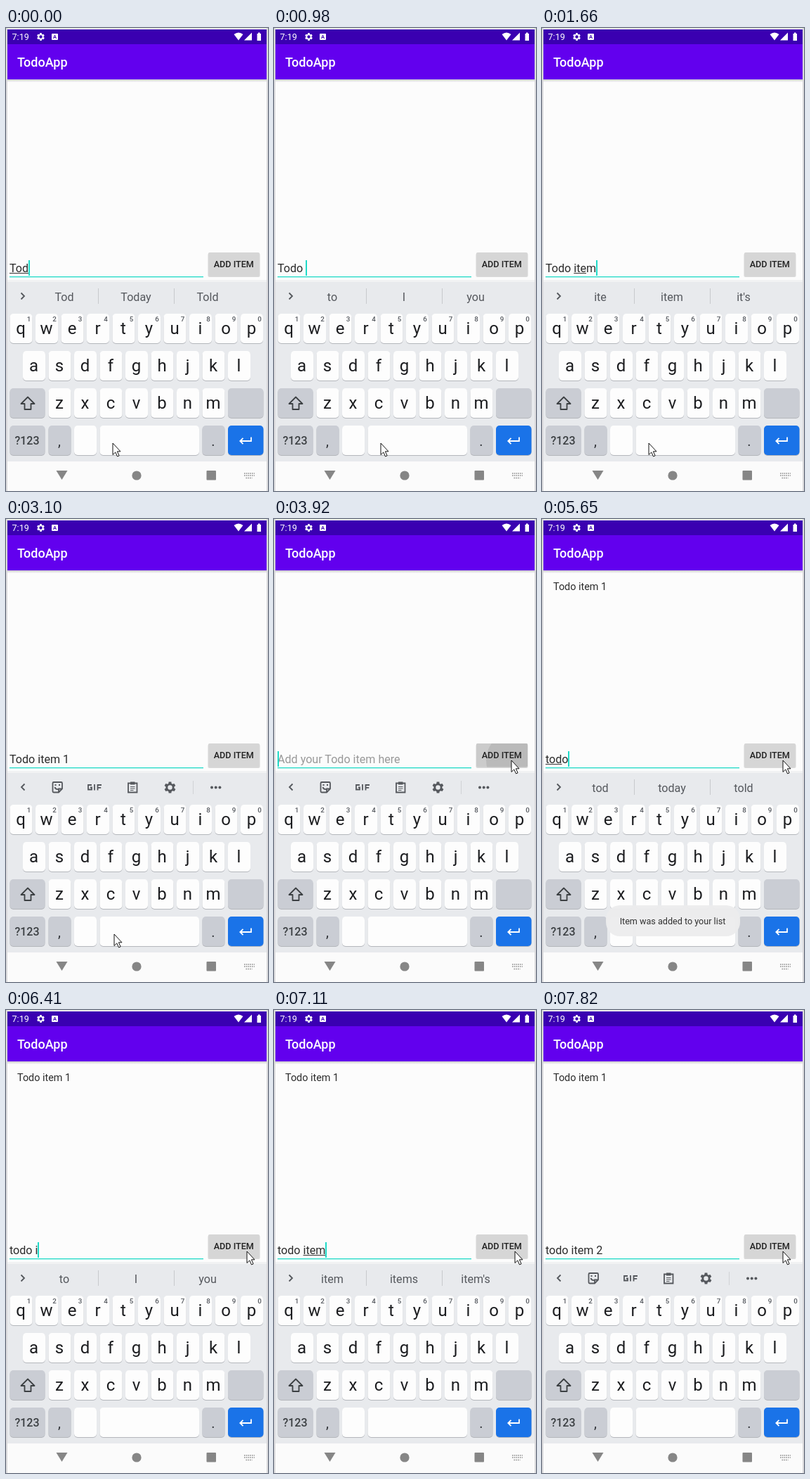
An HTML page that plays this animation: 373x658 px, repeating every 8 s.

```html
<!DOCTYPE html>
<html lang="en">
<head>
<meta charset="utf-8">
<title>Todo app</title>
<style>
html, body { margin: 0; width: 100%; height: 100%; overflow: hidden; background: #fff; }
svg { display: block; width: 373px; height: 658px; }
text { font-family: Roboto, Arial, sans-serif; white-space: pre; }
.medium { font-weight: 500; }
.mid { text-anchor: middle; }
.key { font-size: 24px; fill: #1c1d20; }
.mark { font-size: 20px; fill: #303338; }
.digit { font-size: 9.8px; fill: #54585e; }
.hintbar { font-size: 16.1px; fill: #55585d; }
.line { fill: none; stroke-width: 1.8; }
</style>
</head>
<body>
<svg viewBox="0 0 373 658">
  <defs>
    <linearGradient id="shade" x2="0" y2="1">
      <stop stop-color="#c9c9cb"/><stop offset="1" stop-color="#fcfcfc"/>
    </linearGradient>
    <clipPath id="buttonClip"><rect x="288" y="319" width="73" height="33.5" rx="2"/></clipPath>
    <path id="gear" fill-rule="evenodd" d="M19.4 13a7.500 7.500 0 0 0 0-2l2.100-1.600-2-3.500-2.500 1a7.300 7.300 0 0 0-1.700-1L15 3.200h-4l-.4 2.700a7.300 7.300 0 0 0-1.700 1l-2.500-1-2 3.500L6.500 11a7.500 7.500 0 0 0 0 2l-2.100 1.600 2 3.500 2.500-1a7.300 7.300 0 0 0 1.700 1l.4 2.700h4l.4-2.700a7.300 7.300 0 0 0 1.700-1l2.500 1 2-3.500zM13 15.500a3.500 3.500 0 1 1 0-7 3.500 3.500 0 0 1 0 7z" transform="translate(-13 -12)"/>
  </defs>

  <rect width="373" height="658" fill="#d9d9dc"/>
  <rect x="2" y="1" width="369" height="657" fill="#fcfcfc"/>
  <rect x="2" y="73" width="369" height="4" fill="url(#shade)"/>

  <!-- status and app bars -->
  <rect x="2" y="2" width="369" height="21" fill="#3a00b1"/>
  <rect x="2" y="23" width="369" height="50" fill="#6200ee"/>
  <g fill="#fff">
    <text x="8.500" y="17" font-size="12.6">7:19</text>
    <use href="#gear" transform="translate(49.500 12.500) scale(.62)"/>
    <rect x="65" y="8" width="9" height="9" rx="1"/>
    <path d="M67.500 15l2-5 2 5M68.200 13.500h2.600" fill="none" stroke="#3a00b1"/>
    <path d="M324.500 9Q331 4 337.500 9L331 17.500zM350 6.500v11h-11zM357.500 8h1.500V6.500h2.500V8H363v10h-5.500z"/>
    <text x="16" y="55" font-size="18" class="medium">TodoApp</text>
  </g>

  <text id="item" x="16" y="100.500" font-size="14.4" fill="#2b2b2b">Todo item 1</text>

  <!-- entry row -->
  <rect x="5" y="353" width="276" height="1.300" fill="#1fdac8"/>
  <text id="entry" x="5" y="347" font-size="16.1"/>
  <rect id="under" y="348" height="1" fill="#333"/>
  <rect id="caret" y="330" width="2" height="22" fill="#1fdac8"/>
  <rect x="287.500" y="320" width="74" height="34" rx="2" fill="#c4c4c4" opacity=".6"/>
  <rect x="288" y="319" width="73" height="33.500" rx="2" fill="#d6d6d6"/>
  <g id="ripple" clip-path="url(#buttonClip)">
    <rect x="288" y="319" width="73" height="34" fill="#cbcbcb"/>
    <circle cx="343" cy="343" r="41" fill="#bababa"/>
  </g>
  <text x="324.300" y="340" font-size="12.6" class="medium mid" fill="#222">ADD ITEM</text>

  <!-- keyboard -->
  <rect x="2" y="358" width="369" height="3" fill="#f1f2f3"/>
  <rect x="2" y="361" width="369" height="255" fill="#e8eaed"/>
  <g id="words">
    <path d="M21.500 376.500l4.500 4.500-4.500 4.500" class="line" stroke="#55585d"/>
    <path d="M131.500 370v22M239.500 370v22" stroke="#c8cacd"/>
    <text class="hintbar mid" x="83" y="387.500"/>
    <text class="hintbar mid" x="185" y="387.500"/>
    <text class="hintbar mid" x="287" y="387.500"/>
  </g>
  <g id="tools" fill="#55585d" stroke="#55585d">
    <path d="M26.500 376.500l-4.500 4.500 4.500 4.500" class="line"/>
    <path d="M68 374h10.500a1.500 1.500 0 0 1 1.500 1.500v8l-5 5h-7a1.500 1.500 0 0 1-1.500-1.500v-11.500a1.500 1.500 0 0 1 1.500-1.500zM75 388v-4.500h5M69.500 381q1 3.800 5 3" class="line" stroke-width="1.500"/>
    <path d="M69.500 378h2m3.500 0h2" stroke-width="1.800"/>
    <path d="M122 378h-5v6.500h5v-3h-2.200M126 377v8.500M130.500 385.500V378h5.500M130.500 381.800h4.700" class="line"/>
    <path d="M174 375.500h12.500v13H174z" class="line" stroke-width="1.500"/>
    <path d="M177 373.500h6.500v4H177z" stroke="none"/>
    <path d="M177 380.500h6.500M177 383h6.500M177 385.500h4.500" stroke-width="1.200"/>
    <use href="#gear" stroke="none" transform="translate(233.500 381.500) scale(.92)"/>
    <path d="M266.500 372v19" stroke="#d0d2d5"/>
    <g stroke="none"><circle cx="293" cy="381.500" r="2"/><circle cx="298.700" cy="381.500" r="2"/><circle cx="304.400" cy="381.500" r="2"/></g>
  </g>
  <g id="keys"></g>
  <path d="M31 524.500l-9.500 9.500h5v8h9v-8h5z" class="line" stroke="#3c4043" stroke-linejoin="round" stroke-width="1.700"/>
  <path d="M349 581.500v5.500h-15.500m4-4.200l-4.200 4.200 4.200 4.200" class="line" stroke="#fff"/>

  <!-- toast -->
  <g id="toast">
    <rect x="91" y="549" width="191" height="44" rx="20" fill="#ededee" opacity=".96"/>
    <text x="186" y="576" font-size="12.6" class="mid" fill="#303030">Item was added to your list</text>
  </g>

  <!-- navigation bar -->
  <rect x="2" y="616" width="369" height="42" fill="#fbfbfb"/>
  <g fill="#868686">
    <path d="M71.500 629h16l-8 13z"/>
    <circle cx="186" cy="636" r="6.600"/>
    <rect x="285.500" y="629" width="13.500" height="13.500" rx="1"/>
    <path d="M339 633h15M339 636h15M341.500 639.500h9" stroke="#8d8d8d" stroke-width="1.400" stroke-dasharray="1.600 1.200"/>
  </g>

  <path id="mouse" d="M0 0v16.500l3.800-3.600 2.700 6 2.600-1.100-2.700-6H11z" fill="#fff" stroke="#111" stroke-linejoin="round"/>
</svg>

<script>
const LOOP = 8000, FONT = '16.1px Roboto, Arial, sans-serif';
const $ = id => document.getElementById(id);
const pen = document.createElement('canvas').getContext('2d');
const width = s => { pen.font = FONT; return pen.measureText(s).width; };

// keyboard
let markup = '';
function key(x, y, w, label = '', fill = '#fdfdfd', cls = 'key') {
  const base = y + (cls === 'medium' ? 27 : 28.5);
  markup += `<rect x="${x}" y="${y + 1}" width="${w}" height="42" rx="5" fill="#b4b7bc"/>
    <rect x="${x}" y="${y}" width="${w}" height="42" rx="5" fill="${fill}"/>
    <text x="${x + w / 2 - 0.5}" y="${base}" class="${cls} mid">${label}</text>`;
}
const PITCH = 36.5, GREY = '#cacdd4';
[['qwertyuiop', 5.5, 406], ['asdfghjkl', 24, 459], ['zxcvbnm', 60.5, 512]].forEach(([row, x0, y]) =>
  [...row].forEach((c, i) => {
    const x = x0 + i * PITCH;
    key(x, y, 32, c);
    if (y === 406) markup += `<text x="${x + 27}" y="417" class="digit medium mid">${(i + 1) % 10}</text>`;
  }));
key(5.5, 512, 50, '', GREY);
key(316, 512, 50.5, '', GREY);
key(5.5, 565, 50, '<tspan font-size="16" fill="#3c4043">?123</tspan>', GREY, 'medium');
key(60.5, 565, 32, ',', GREY, 'mark');
key(97, 565, 32);
key(133.5, 565, 141.5);
key(279.5, 565, 32, '.', GREY, 'mark');
key(316, 565, 50.5, '', '#1a73e8');
$('keys').innerHTML = markup;

// time, text, underlined range start and end, suggestions (none shows the tool row)
const NEXT = 'to I you', ITE = "ite item it's", ITEM = 'item items item\'s';
const typing = [
  [0, 'Tod', 0, 3, 'Tod Today Told'],
  [430, 'Todo', 0, 3, 'Tod Today Told'],
  [710, 'Todo', 0, 4, 'Todo Todos Today'],
  [840, 'Todo ', 0, 0, 'Todo Todos Today'],
  [980, 'Todo ', 0, 0, NEXT],
  [1260, 'Todo i', 0, 0, NEXT],
  [1390, 'Todo it', 5, 6, 'I is in'],
  [1530, 'Todo ite', 5, 7, "it it's its"],
  [1660, 'Todo item', 5, 8, ITE],
  [1800, 'Todo item', 5, 9, ITEM],
  [2060, 'Todo item ', 0, 0, ITEM],
  [2200, 'Todo item ', 0, 0, NEXT],
  [2450, 'Todo item 1', 0, 0, NEXT],
  [2700, 'Todo item 1', 0, 0, ''],
  [3920, '', 0, 0, ''],
  [4950, 't', 0, 0, ''],
  [5090, 'to', 0, 1, 't to the'],
  [5230, 'to', 0, 2, 'to too today'],
  [5500, 'tod', 0, 2, 'to too today'],
  [5640, 'todo', 0, 3, 'tod today told'],
  [5780, 'todo', 0, 4, 'todo today told'],
  [5920, 'todo ', 0, 0, 'todo today told'],
  [6060, 'todo ', 0, 0, NEXT],
  [6410, 'todo i', 0, 0, NEXT],
  [6560, 'todo it', 5, 6, 'I is in'],
  [6690, 'todo ite', 5, 7, "it it's its"],
  [6830, 'todo item', 5, 8, ITE],
  [7110, 'todo item', 5, 9, ITEM],
  [7260, 'todo item ', 0, 0, NEXT],
  [7550, 'todo item 2', 0, 0, '']
];
const mouse = [
  [0, 152, 590], [3100, 154, 590], [3250, 178, 569], [3390, 232, 497],
  [3530, 293, 409], [3660, 336, 350], [3920, 338, 343], [4070, 343, 343]
];
const caretOff = [[3100, 3660], [4490, 4950], [7820, LOOP]];
const toastFade = [[0, 0], [4230, .35], [4360, .75], [4490, 1], [6150, .5], [6280, .2], [6410, 0]];
const rippleFade = [[0, 0], [3920, 1], [4070, .7], [4230, .3], [4360, 0]];

const at = (steps, t) => steps.findLast(s => s[0] <= t);
const show = (el, on) => el.setAttribute('visibility', on ? 'visible' : 'hidden');
const labels = document.querySelectorAll('.hintbar');

function draw(t) {
  const [, text, from, to, words] = at(typing, t);
  const entry = $('entry'), under = $('under');
  entry.textContent = text || 'Add your Todo item here';
  entry.setAttribute('fill', text ? '#2b2b2b' : '#999');
  const start = width(text.slice(0, from));
  under.setAttribute('x', 5 + start);
  under.setAttribute('width', width(text.slice(0, to)) - start);

  $('caret').setAttribute('x', Math.floor(5 + width(text)));
  show($('caret'), !caretOff.some(([a, b]) => t >= a && t < b));
  show($('words'), words);
  show($('tools'), !words);
  words.split(' ').forEach((w, i) => labels[i].textContent = w);

  show($('item'), t >= 4070);
  $('ripple').setAttribute('opacity', at(rippleFade, t)[1]);
  $('toast').setAttribute('opacity', at(toastFade, t)[1]);
  const [, x, y] = at(mouse, t);
  $('mouse').setAttribute('transform', `translate(${x} ${y})`);
}

const begin = performance.now();
function tick() {
  draw((performance.now() - begin) % LOOP);
  requestAnimationFrame(tick);
}
tick();
</script>
</body>
</html>
```
